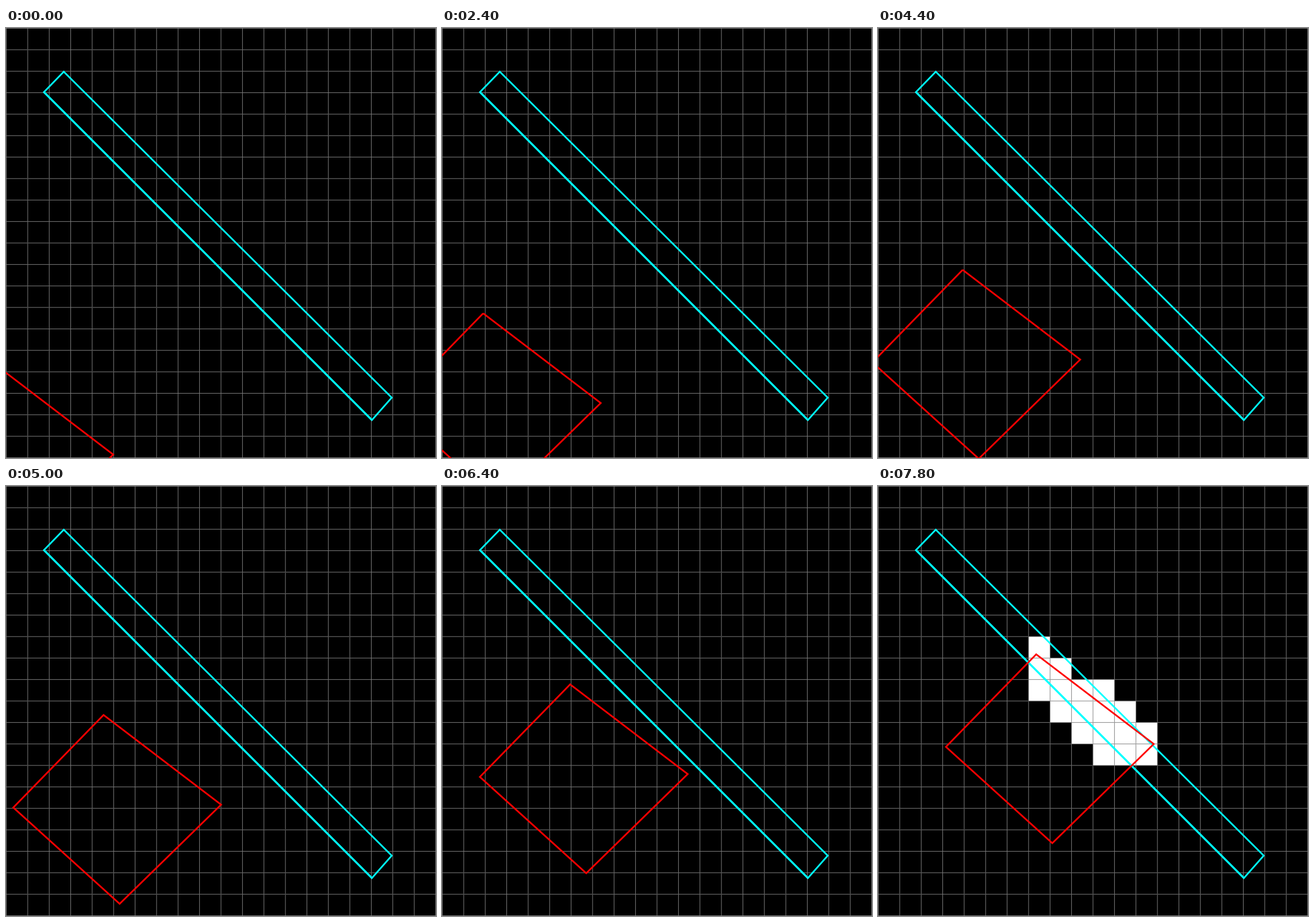
Recreate the animation shown at these times as a matplotlib script. Size 748 by 748 pixels, loop 8 s.

```python
import numpy as np
import matplotlib.pyplot as plt
from matplotlib.animation import FuncAnimation
from matplotlib.patches import Polygon

SIZE, CELLS, FRAMES = 748, 20, 40
CELL = (SIZE - 1) / CELLS
UNIT = CELL / 40          # the scene is laid out with 40 units per cell
SPEED = 8.0625            # units per step, truncated to whole units
START = np.array([-18.0, 586.0])
STRIP = np.array([(100.5, 76), (671, 643), (636.5, 682), (66, 111.5)])
QUAD = np.array([(0, 0), (204.5, 156), (28, 328.5), (-157, 161)])
NUDGE = np.array([1.5, -1.4])
GRAY = 128


def quad_at(i):
    dist = UNIT * (int(SPEED * (i + 1)) - int(SPEED))
    return QUAD + START + (dist, -dist)


def clip(poly, window):
    """Clip a convex polygon to a convex window, both clockwise on screen."""
    pts = list(poly)
    for a, b in zip(window, np.roll(window, -1, axis=0)):
        def side(p):
            return (b[0] - a[0]) * (p[1] - a[1]) - (b[1] - a[1]) * (p[0] - a[0])

        out = []
        for p, q in zip(pts, pts[1:] + pts[:1]):
            sp, sq = side(p), side(q)
            if sp >= 0:
                out.append(p)
            if sp * sq < 0:
                out.append(p + (q - p) * sp / (sp - sq))
        pts = out
    return pts


def line_cover():
    """Share of each pixel column covered by one-pixel-wide grid lines."""
    px = np.arange(SIZE)[:, None]
    lines = CELL * np.arange(CELLS + 1)
    return np.clip(1 - abs(px - lines), 0, 1).max(axis=1)


COVER = np.maximum.outer(line_cover(), line_cover())


def span(k):
    return slice(int(k * CELL) + 1, int((k + 1) * CELL) + 1)


def board(i):
    cells = np.zeros((SIZE, SIZE))
    overlap = clip(quad_at(i), STRIP)
    if overlap:
        shape = np.array(overlap) + NUDGE
        for row in range(CELLS):
            for col in range(CELLS):
                x, y = col * CELL, row * CELL
                box = np.array([(x, y), (x + CELL, y), (x + CELL, y + CELL), (x, y + CELL)])
                if clip(shape, box):
                    cells[span(row), span(col)] = 255
    return cells * (1 - COVER) + GRAY * COVER


fig = plt.figure(figsize=(SIZE / 100, SIZE / 100), dpi=100, facecolor="black")
ax = fig.add_axes([0, 0, 1, 1])
ax.axis("off")
view = ax.imshow(board(0), cmap="gray", vmin=0, vmax=255, interpolation="nearest",
                 aspect="auto", extent=(0, SIZE, SIZE, 0))
ax.set_xlim(0, SIZE)
ax.set_ylim(SIZE, 0)

PX = 72 / 100
ax.add_patch(Polygon(STRIP, fill=False, ec="cyan", lw=2.9 * PX, joinstyle="miter"))
ax.plot(*STRIP[2:].T, color="cyan", lw=3.3 * PX, solid_capstyle="butt")
quad = ax.add_patch(Polygon(quad_at(0), fill=False, ec="red", lw=2.9 * PX,
                            joinstyle="miter", zorder=5))


def draw(i):
    view.set_data(board(i))
    quad.set_xy(quad_at(i))
    return view, quad


anim = FuncAnimation(fig, draw, frames=FRAMES, interval=200, repeat=True, repeat_delay=0)
plt.show()
```
